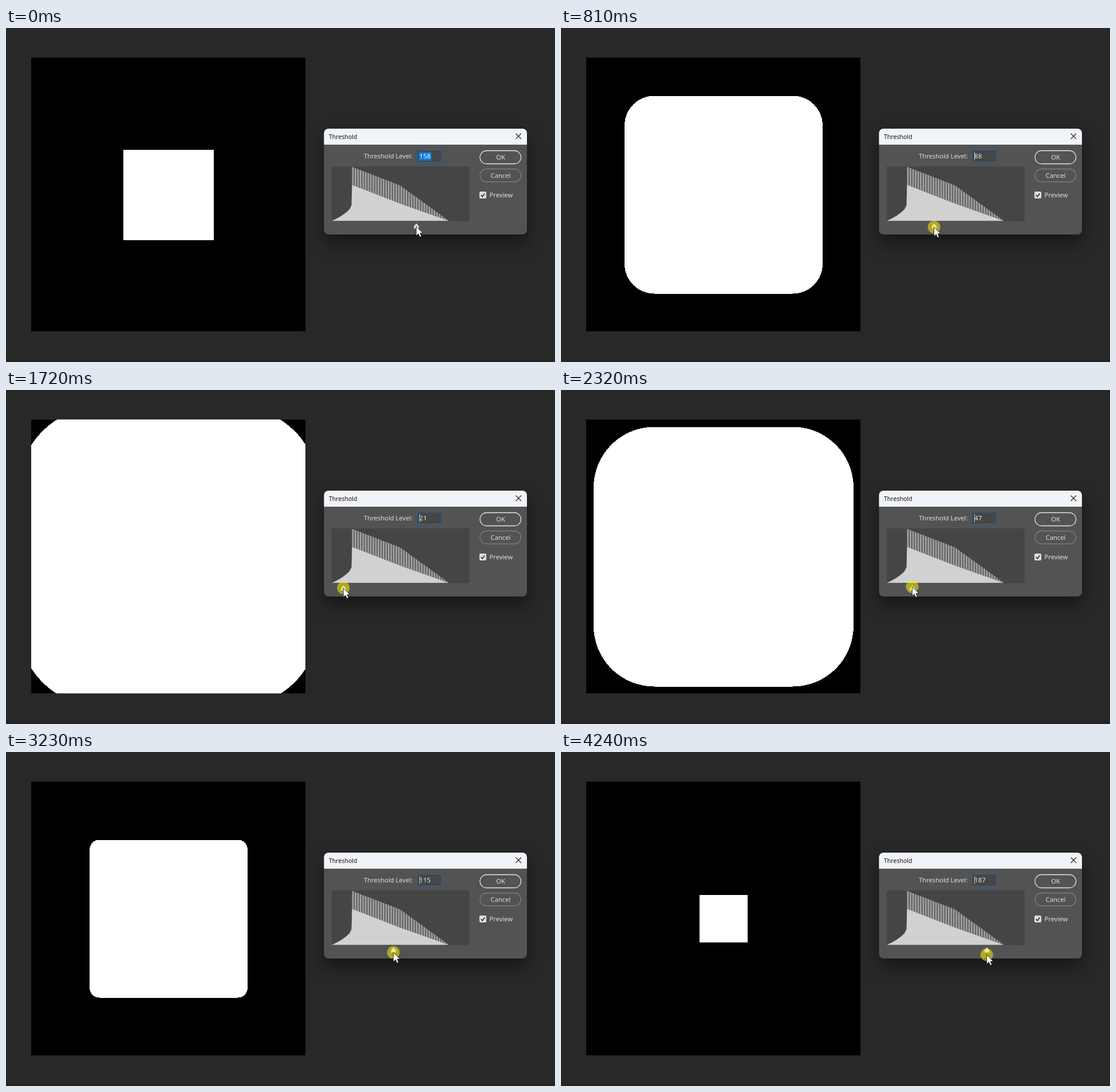
Recreate the animation shown at these times as an HTML page. Size 959 px wide and 584 px high, loop 4340 ms.

```html
<!DOCTYPE html>
<html>
<head>
<meta charset="utf-8">
<style>
html, body { margin: 0; width: 100%; height: 100%; overflow: hidden; background: #282828; }
svg { display: block; width: 100vw; height: 100vh; }
text { font: 11.2px "Noto Sans", "Open Sans", sans-serif; fill: #dedede; }
.mid { text-anchor: middle; }
#dialog { filter: drop-shadow(0 14px 15px rgba(0, 0, 0, .45)); }
</style>
</head>
<body>
<svg viewBox="0 0 959 584">
  <defs><clipPath id="page"><rect x="44" y="51.6" width="479" height="479"/></clipPath></defs>
  <rect y="580" width="959" height="4" fill="#242424"/>
  <g clip-path="url(#page)">
    <rect x="44" y="51.6" width="479" height="479"/>
    <rect id="shape" fill="#fff" shape-rendering="crispEdges"/>
  </g>

  <rect id="dialog" x="555.5" y="176" width="354.5" height="185" rx="8" fill="#535353"/>
  <path d="M555.5 204V184a8 8 0 0 1 8-8H902a8 8 0 0 1 8 8V204Z" fill="#f0f3f7"/>
  <text x="564" y="193.6" style="font-size:10.5px;fill:#111">Threshold</text>
  <path d="M890.5 184.5l9.5 9.5m0-9.5l-9.5 9.5" stroke="#222" stroke-width="1.1"/>

  <text x="625" y="228">Threshold Level:</text>
  <rect x="717.5" y="213.5" width="43.5" height="21" rx="1" fill="#464646" stroke="#1a69bd"/>
  <rect id="selection" x="721" y="217" width="22" height="15" fill="#0a78d7"/>
  <path id="caret" d="M722.5 217v14" stroke="#c8c8b8"/>
  <text id="value" x="722" y="228.3" style="font-size:11.6px"></text>

  <g fill="none" stroke-width="1.3">
    <rect x="828" y="214.5" width="71.5" height="23" rx="11.5" stroke="#e6e6e6"/>
    <rect x="828" y="246.5" width="71.5" height="22.5" rx="11.2" stroke="#7e7e7e"/>
  </g>
  <text class="mid" x="864" y="230">OK</text>
  <text class="mid" x="864" y="262">Cancel</text>
  <rect x="827" y="286" width="12" height="12" rx="2" fill="#dedede"/>
  <path d="M829.7 292l2.5 2.8 4.2-5.6" fill="none" stroke="#333" stroke-width="1.7"/>
  <text x="844.5" y="296">Preview</text>

  <rect x="569" y="242" width="240.5" height="96" fill="#454545"/>
  <path id="bars" fill="#9d9d9d"/>
  <path d="M569 337.3Q590 328 600 317L603.5 310 604.5 275H606L688 307 773 337.3Z" fill="#d1d1d1"/>

  <path id="handle" d="M0 341.2L4.7 346.3V349.5Q4.7 351 3.2 351H-3.2Q-4.7 351-4.7 349.5V346.3Z" fill="#dcdcdc" stroke="#404040" stroke-width=".7"/>
  <g id="cursor">
    <circle id="halo" r="11" fill="#fff50a" fill-opacity=".52"/>
    <path d="M0 0V16.2L3.8 12.7 6.2 18.4 9 17.2 6.6 11.6H11.5Z" fill="#fff" stroke="#222" stroke-width=".9"/>
  </g>
</svg>
<script>
const $ = id => document.getElementById(id);
const LOOP = 4340;

// tick, threshold level, half width of the white shape, pointer height
const keys = [
  [0, 158, 79, 347], [2, 158, 79, 348], [3, 156.5, 80.5, 349], [4, 153, 84, 350],
  [5, 146, 92, 350], [6, 130, 117, 350], [8, 88, 173, 348], [9, 71, 193, 348],
  [10, 59, 208, 347.5], [11, 46, 226, 347], [12, 35, 242, 346], [13, 27, 254, 346],
  [15, 19, 264, 346], [16, 19, 264, 346], [17, 21, 261, 346], [22, 41, 234, 345],
  [23, 47, 227, 344], [28, 86, 175, 348], [32, 115, 138, 350.5], [34, 138, 106, 351],
  [40, 176, 56, 353.5], [42, 187, 41.8, 354.5]
];

// ticks are 100 ms apart, with 10 ms extra at a few of them
const tickStart = n => 100 * n + 10 * [3, 15, 26, 35].filter(k => n >= k).length;

function pose(n) {
  const i = Math.max(1, keys.findIndex(k => k[0] >= n));
  const a = keys[i - 1], b = keys[i];
  const p = (n - a[0]) / (b[0] - a[0]);
  return a.map((v, j) => v + (b[j] - v) * p);
}

function setAttrs(id, attrs) {
  for (const name in attrs) $(id).setAttribute(name, attrs[name]);
}

function drawBars() {
  const top = x => x < 688 ? 243 + (x - 605) * .386 : 275 + (x - 688) * .725;
  let d = "";
  for (let x = 604.5; x < 770; x += 4.45)
    d += `M${x} 337V${top(x)}L${x + 3.2} ${top(x + 3.2)}V337Z`;
  $("bars").setAttribute("d", d);
}

function draw(t) {
  let n = 42;
  while (n > 0 && tickStart(n) > t) n--;
  const [, level, half, y] = pose(n);
  const x = 570 + .93 * level;
  const idle = n === 0;
  setAttrs("shape", {
    x: 284 - half, y: 291.5 - half, width: 2 * half, height: 2 * half,
    rx: Math.max(0, half - 121)
  });
  setAttrs("handle", { transform: `translate(${x})` });
  setAttrs("cursor", { transform: `translate(${x - .3} ${y})` });
  $("value").textContent = Math.round(level);
  $("value").style.fill = idle ? "#fff" : "#e8e6cc";
  setAttrs("selection", { opacity: idle ? 1 : 0 });
  setAttrs("caret", { opacity: idle ? 0 : 1 });
  setAttrs("halo", { opacity: idle ? 0 : 1 });
}

drawBars();
const start = performance.now();
function loop() {
  draw((performance.now() - start) % LOOP);
  requestAnimationFrame(loop);
}
loop();
</script>
</body>
</html>
```
